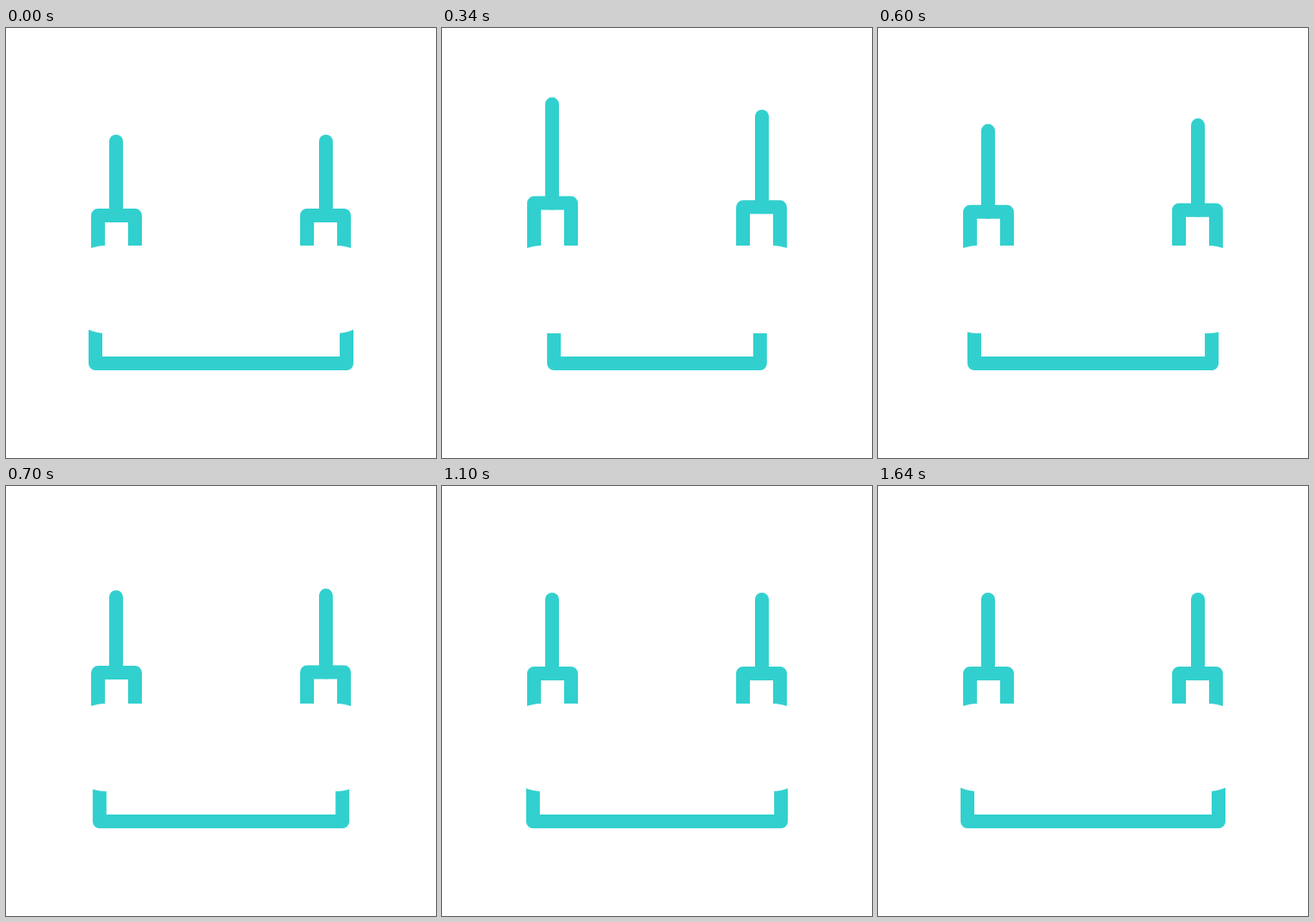
Write an HTML page with a canvas that moves like this. It is 500x500 px and loops after 3 s.

```html
<!DOCTYPE html>
<html lang="en">
<head>
<meta charset="utf-8">
<title>Robot face loop</title>
<style>
  html, body { margin: 0; width: 100%; height: 100%; overflow: hidden; background: #fff; }
  canvas { display: block; width: 100vmin; height: 100vmin; }
</style>
</head>
<body>
<canvas id="stage" width="500" height="500"></canvas>
<script>
const ctx = document.getElementById('stage').getContext('2d');
const LOOP = 3000, STEP = 20, SIZE = 500;
const COLOR = '#31d0ce';

// Cubic bezier easing with handles (a, 0) and (b, 1), solved by bisection.
function ease(u, a, b) {
  let lo = 0, hi = 1;
  for (let i = 0; i < 24; i++) {
    const s = (lo + hi) / 2, r = 1 - s;
    if (3 * r * r * s * a + 3 * r * s * s * b + s * s * s < u) lo = s; else hi = s;
  }
  return lo * lo * (3 - 2 * lo);
}

// Keys are [time, value] pairs.
function track(keys, t, b) {
  if (t <= keys[0][0]) return keys[0][1];
  for (let i = 1; i < keys.length; i++) {
    const [t0, v0] = keys[i - 1], [t1, v1] = keys[i];
    if (t < t1) return v0 + (v1 - v0) * ease((t - t0) / (t1 - t0), 0.33, b);
  }
  return keys[keys.length - 1][1];
}

const BAR_X = [[80, 104], [260, 131.5], [960, 106.3], [1640, 104]];
const LIFT = [[259, 0], [450, 54], [831, 0]];
const RIGHT_DELAY = 31;

function line(...pts) {
  ctx.beginPath();
  pts.forEach(([x, y]) => ctx.lineTo(x, y));
  ctx.stroke();
}

function antenna(lift, mirror) {
  const px = x => mirror ? SIZE - x : x;
  const top = 218 - lift / 3;
  line([px(128), 132 - lift], [px(128), top]);
  line([px(107), 304], [px(107), top], [px(150), top], [px(150), 304]);
}

function draw(t) {
  ctx.fillStyle = '#fff';
  ctx.fillRect(0, 0, SIZE, SIZE);
  ctx.strokeStyle = COLOR;
  ctx.lineWidth = 16;
  ctx.lineCap = ctx.lineJoin = 'round';

  antenna(track(LIFT, t, 0), false);
  antenna(track(LIFT, t - RIGHT_DELAY, 0), true);

  const x = track(BAR_X, t, 0.2);
  line([x, 304], [x, 390], [SIZE - x, 390], [SIZE - x, 304]);

  // White pill that hides the inner ends.
  ctx.strokeStyle = '#fff';
  ctx.lineWidth = 102;
  line([116, 304], [384, 304]);
}

const start = performance.now();
function tick() {
  const t = (performance.now() - start) % LOOP;
  draw(Math.floor(t / STEP) * STEP);
  requestAnimationFrame(tick);
}
tick();
</script>
</body>
</html>
```
